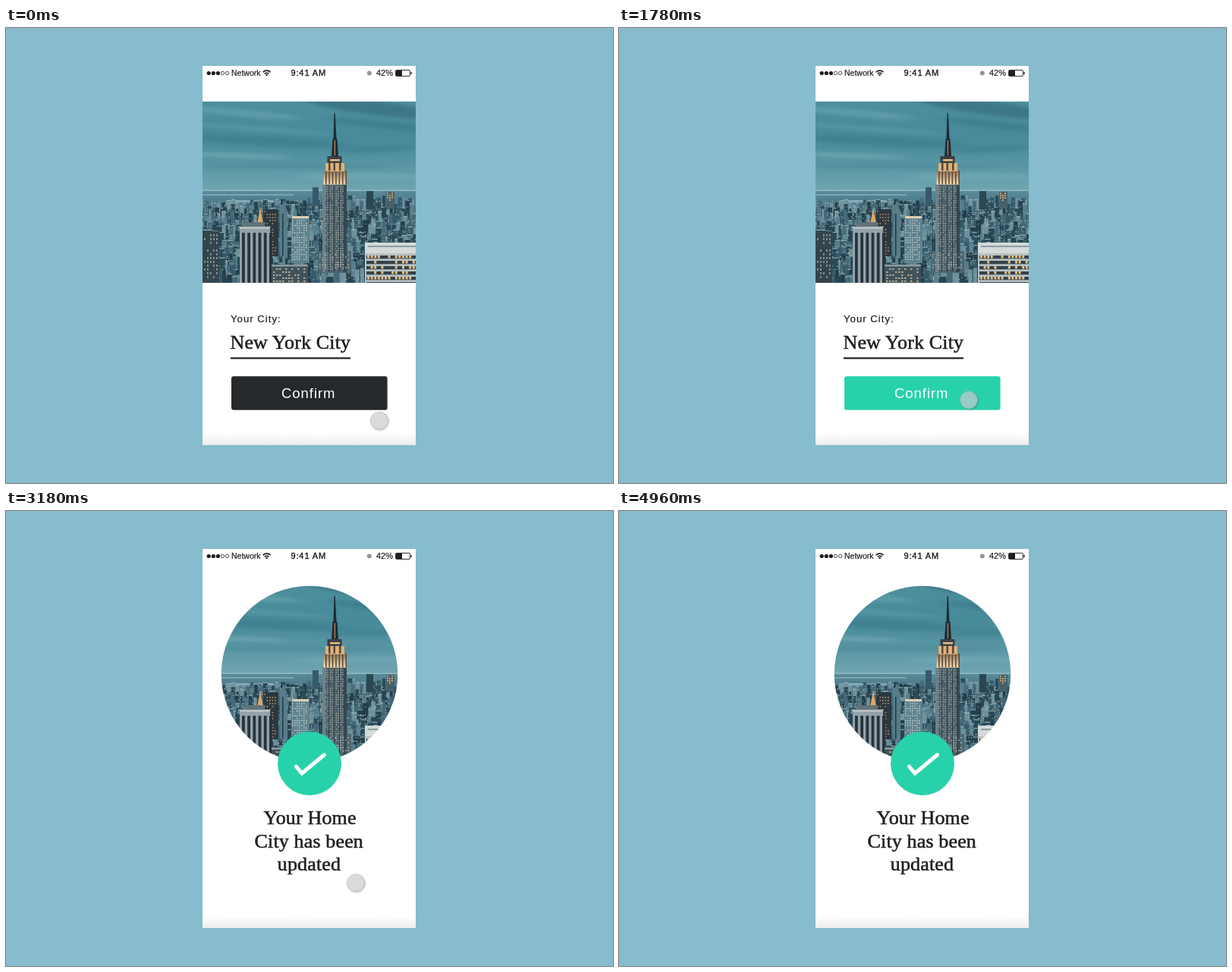
These frames come from a looping animation (800 px wide and 600 px high, 4.98 s). An HTML page:

```html
<!DOCTYPE html>
<html lang="en">
<head>
<meta charset="utf-8">
<title>Home city confirmation</title>
<style>
  html, body { margin: 0; width: 100%; height: 100%; overflow: hidden; background: #86bccd; }
  svg { display: block; width: 800px; height: 600px; }
  text { font-family: "Liberation Sans", Arial, sans-serif; fill: #1d2023; }
  .label { stroke: #1d2023; stroke-width: .2px; }
  .serif { font: 26px "Liberation Serif", "Times New Roman", serif; letter-spacing: .15px; stroke: #1d2023; stroke-width: .55px; }
  .heading { text-anchor: middle; }
  #cursor { filter: drop-shadow(1px 1.5px 1px rgba(0, 0, 0, .28)); }
</style>
</head>
<body>
<svg viewBox="0 0 800 600">
  <defs>
    <clipPath id="screenClip"><rect x="259" y="50" width="281" height="500"/></clipPath>
    <clipPath id="photoClip"><rect x="259" y="97" width="281" height="239"/></clipPath>
    <clipPath id="roundClip"><circle cx="400" cy="215" r="116.3"/></clipPath>
    <linearGradient id="sky" x1="0" y1="0" x2="0" y2="1">
      <stop offset="0" stop-color="#4e8f9d"/>
      <stop offset=".4" stop-color="#478a99"/>
      <stop offset=".75" stop-color="#5c98a6"/>
      <stop offset="1" stop-color="#72a6b1"/>
    </linearGradient>
    <linearGradient id="land" x1="0" y1="0" x2="0" y2="1">
      <stop offset="0" stop-color="#5b8c9a"/>
      <stop offset=".25" stop-color="#41697a"/>
      <stop offset="1" stop-color="#2d4a58"/>
    </linearGradient>
    <linearGradient id="crown" x1="0" y1="0" x2="0" y2="1">
      <stop offset="0" stop-color="#8d7458"/>
      <stop offset="1" stop-color="#fbe0b0"/>
    </linearGradient>
    <linearGradient id="fold" x1="0" y1="0" x2="0" y2="1">
      <stop offset="0" stop-color="#fff"/>
      <stop offset="1" stop-color="#ececec"/>
    </linearGradient>
    <filter id="soft" x="-30%" y="-150%" width="160%" height="400%"><feGaussianBlur stdDeviation="9 2"/></filter>
    <g id="city" clip-path="url(#photoClip)"></g>
  </defs>

  <rect width="800" height="600" fill="#86bccd"/>
  <g clip-path="url(#screenClip)">
    <rect x="259" y="50" width="281" height="500" fill="#fff"/>
    <rect x="259" y="534" width="281" height="16" fill="url(#fold)"/>

    <g id="status" fill="#1d2023">
      <circle cx="267.2" cy="59.5" r="2.6"/><circle cx="273.3" cy="59.5" r="2.6"/><circle cx="279.4" cy="59.5" r="2.6"/>
      <g fill="none" stroke="#1d2023" stroke-width=".8">
        <circle cx="285.5" cy="59.5" r="2.2"/><circle cx="291.6" cy="59.5" r="2.2"/>
      </g>
      <text class="label" x="297" y="63.4" font-size="10.5">Network</text>
      <g fill="none" stroke="#1d2023" stroke-width="1.6">
        <path d="M338.6 58.2a7 7 0 0 1 10 0M340.7 60.5a4 4 0 0 1 5.8 0"/>
      </g>
      <circle cx="343.6" cy="62" r="1.3"/>
      <text x="375.4" y="63.2" font-size="11" letter-spacing=".9" stroke="#1d2023" stroke-width=".4">9:41 AM</text>
      <circle cx="478.8" cy="59.5" r="3" fill="#949799"/>
      <text class="label" x="488" y="63.2" font-size="11">42%</text>
      <rect x="513.5" y="55.5" width="19" height="8" rx="1.5" fill="none" stroke="#1d2023" stroke-width=".9"/>
      <rect x="514" y="56" width="8" height="7"/>
      <rect x="533.4" y="58" width="1.4" height="3" rx=".6"/>
    </g>

    <use id="photo" href="#city"/>
    <g clip-path="url(#roundClip)"><use href="#city"/></g>

    <g id="form">
      <text class="label" x="296" y="388" font-size="13.2" letter-spacing="1">Your City:</text>
      <text class="serif" x="295.5" y="423.3">New York City</text>
      <rect x="296" y="434.3" width="158" height="2.2" fill="#1d2023"/>
      <rect id="button" x="297" y="459.2" width="205.6" height="44.6" rx="3" fill="#25292c"/>
      <text x="363" y="488" font-size="18.5" letter-spacing=".95" style="fill:#fff">Confirm</text>
    </g>

    <g transform="translate(400 333)">
      <g id="badge">
        <circle r="42" fill="#27d2ab"/>
        <path d="M-17.5 4L-10 13L19.5 -11.5" fill="none" stroke="#fff" stroke-width="5" stroke-linecap="round"/>
      </g>
    </g>

    <g id="done">
      <text class="serif heading" x="400.5" y="413.3">Your Home</text>
      <text class="serif heading" x="399.3" y="444.3">City has been</text>
      <text class="serif heading" x="399.5" y="474.3">updated</text>
    </g>

    <g id="cursor"><circle r="11.5" fill="rgba(222,222,222,.62)" stroke="rgba(160,160,160,.6)"/></g>
  </g>
</svg>
<script>
const LOOP = 4980;
const $ = id => document.getElementById(id);
const city = $('city');

let seed = 17;
const rand = () => (seed = (seed * 16807) % 2147483647) / 2147483647;
const pick = list => list[Math.floor(rand() * list.length)];

function add(tag, attrs) {
  const node = document.createElementNS('http://www.w3.org/2000/svg', tag);
  for (const key in attrs) node.setAttribute(key, attrs[key]);
  city.appendChild(node);
}
const box = (x, y, width, height, fill) => add('rect', { x, y, width, height, fill });
const shape = (d, fill) => add('path', { d, fill });
const cloud = (cx, cy, rx, ry, fill, opacity, tilt = 0) =>
  add('ellipse', { cx, cy, rx, ry, fill, opacity, filter: 'url(#soft)', transform: `rotate(${tilt} ${cx} ${cy})` });

// Evenly spaced windows drawn as one path
function windows(x, y, w, h, dx, dy, ww, wh, fill, chance = 1) {
  let d = '';
  for (let v = y; v + wh <= y + h; v += dy)
    for (let u = x; u + ww <= x + w; u += dx)
      if (rand() < chance) d += `M${u} ${v}h${ww}v${wh}h${-ww}z`;
  shape(d, fill);
}

function drawSky() {
  box(259, 97, 281, 119, 'url(#sky)');
  cloud(490, 106, 95, 9, '#30697a', .6, 7);
  cloud(500, 128, 75, 5, '#346f7f', .45, 6);
  cloud(310, 112, 80, 5, '#6ba4b0', .6, 5);
  cloud(330, 133, 100, 3, '#639eab', .6, 4);
  cloud(350, 150, 110, 6, '#3a7a8a', .55, 3);
  cloud(300, 168, 75, 3, '#74aab5', .7, 2);
  cloud(490, 160, 60, 5, '#3d7c8c', .5, -3);
  cloud(380, 182, 130, 4, '#4d8b9a', .6);
  cloud(470, 196, 90, 4, '#7aafb9', .5);
}

function drawBlocks() {
  const tones = ['#233d4a', '#2b4a58', '#365a69', '#45697a', '#577f8d', '#6e929d', '#284451'];
  box(259, 214, 281, 122, 'url(#land)');
  box(259, 213.5, 281, 1.5, '#8fbac3');
  box(259, 219, 120, 2, '#7aa6b2');
  box(290, 227, 62, 3, '#84adb8');
  for (let row = 0; row < 14; row++) {
    const y = 232 + row * 7.5;
    for (let x = 257 + rand() * 5; x < 540;) {
      const w = 2.5 + rand() * (3.5 + row * .3);
      const rise = 1 + rand() * (6 + row * .6) + (x > 385 && row < 2 ? 6 * rand() : 0);
      box(x, y - rise, w, rise + 9, pick(tones));
      if (rand() < .35) box(x, y - rise, w, 1.2, '#8fadb5');
      x += w + rand() * 2;
    }
    windows(259, y - 4, 281, 8, 3.1, 2.8, 1.3, 1.1, '#9bb3b6', .3);
    windows(259, y - 4, 281, 8, 4.3, 3.7, 1.3, 1.2, '#d2b684', .08);
  }
  box(475, 215, 9, 24, '#2b4753');
  box(501, 216, 11, 22, '#46606a');
  windows(502, 217, 9, 12, 3, 3, 2, 2, '#c99f6d', .7);
  box(404, 210, 8, 25, '#37596a');
}

function drawTowers() {
  box(259, 268, 22, 68, '#34444e');
  windows(261, 272, 19, 62, 4, 5, 1.8, 2.8, '#8f9a9a', .6);
  box(339, 239, 20, 62, '#2b3841');
  windows(340, 241, 18, 58, 3.5, 4, 1.8, 1.8, '#a88360', .55);
  shape('M331 258L335 237L339 258z', '#e0a765');
  shape('M361 300V244L366 226L371 244V300z', '#577c8a');
  box(364, 245, 1.5, 55, '#203944');
  box(376, 248, 24, 62, '#5f828e');
  windows(377, 250, 22, 58, 3, 3.2, 1.5, 1.6, '#bccbc9', .8);
  box(377, 248, 22, 3, '#dfceb0');
  box(315, 256, 26, 10, '#62727a');
  box(308, 262, 40, 74, '#93a2a8');
  for (let x = 311; x < 347; x += 7.2) box(x, 270, 3.8, 66, '#28343d');
  box(308, 262, 40, 3, '#b6bfc0');
  box(350, 312, 48, 24, '#40525b');
  windows(352, 317, 45, 19, 4, 4, 2.5, 1.8, '#c3b596', .65);
  box(350, 312, 48, 2.5, '#8c9ca1');
}

function drawLandmark() {
  box(411, 294, 44, 29, '#4f6771');
  box(417, 206, 32, 116, '#4d626c');
  box(417, 206, 4, 116, '#6d828a');
  box(444, 206, 5, 116, '#35474f');
  windows(421, 209, 24, 111, 2.8, 3, 1.3, 1.6, '#a6a99f', .75);
  for (const x of [425, 432, 439]) box(x, 208, 1, 113, '#263740');
  windows(413, 298, 40, 22, 3.4, 3.4, 1.6, 1.7, '#a8b0a9', .5);
  box(418.5, 188, 30, 18.5, 'url(#crown)');
  for (let x = 421; x < 448; x += 4.4) box(x, 188, 1.5, 18, '#57463a');
  box(421, 178, 25, 11, '#dbb27a');
  for (const x of [425, 431.5, 439]) box(x, 178, 2.5, 10, '#5b473a');
  box(423.5, 169, 19, 9, '#3a3f47');
  box(427, 173, 13, 2.5, '#e8bd80');
  shape('M429 169L430.5 146H436.5L438 169z', '#222c35');
  box(432.8, 148, 1.2, 20, '#b78a5b');
  shape('M431.5 146L432.6 112H433.8L435.5 146z', '#1c2c36');
}

function drawCorner() {
  box(473, 283, 67, 53, '#b9c3c4');
  box(473, 283, 67, 14, '#d3dad9');
  box(477, 287, 63, 2, '#8c9da3');
  for (let y = 300; y < 336; y += 7) box(475, y, 65, 4.3, '#33424a');
  windows(476, 300, 64, 36, 4.6, 7, 3, 3.6, '#e3bd85', .55);
}

drawSky();
drawBlocks();
drawTowers();
drawLandmark();
drawCorner();

// steps: [time, value, easing towards the next step]
function track(id, prop, steps) {
  const full = [[0, steps[0][1]], ...steps, [LOOP, steps[steps.length - 1][1]]];
  const frames = full.map(([t, value, easing = 'linear']) => ({ offset: t / LOOP, [prop]: value, easing }));
  $(id).animate(frames, { duration: LOOP, iterations: Infinity });
}

const QUART = 'cubic-bezier(.25,1,.5,1)';
const QUINT = 'cubic-bezier(.22,1,.36,1)';
const at = (x, y) => `translate(${x}px, ${y}px)`;

// The pointer leaves on a curve past the right edge and out at the top
function exitSteps(start, end, count = 24) {
  return Array.from({ length: count + 1 }, (_, i) => {
    const p = i / count, u = p * p * (3 - 2 * p);
    const curve = (a, b, c) => a * (1 - u) ** 2 + 2 * b * u * (1 - u) + c * u * u;
    return [start + (end - start) * p, at(curve(461, 623, 489), curve(490.5, 143, 36))];
  });
}

track('cursor', 'transform', [
  [40, at(492, 518), 'ease-in-out'],
  [540, at(461, 490.5)],
  ...exitSteps(3550, 4400)
]);
track('button', 'fill', [[1440, '#25292c', 'ease-out'], [1680, '#27d2ab']]);
track('form', 'opacity', [[1800, 1, 'ease-out'], [2070, 0]]);
track('photo', 'opacity', [[1800, 1], [2260, 0]]);
track('badge', 'transform', [[1800, 'scale(0)', QUINT], [2400, 'scale(1)']]);
track('done', 'opacity', [[1820, 0, 'ease-out'], [2060, 1]]);
track('done', 'transform', [[1800, at(0, 40), QUART], [2400, at(0, 0)]]);
</script>
</body>
</html>
```
